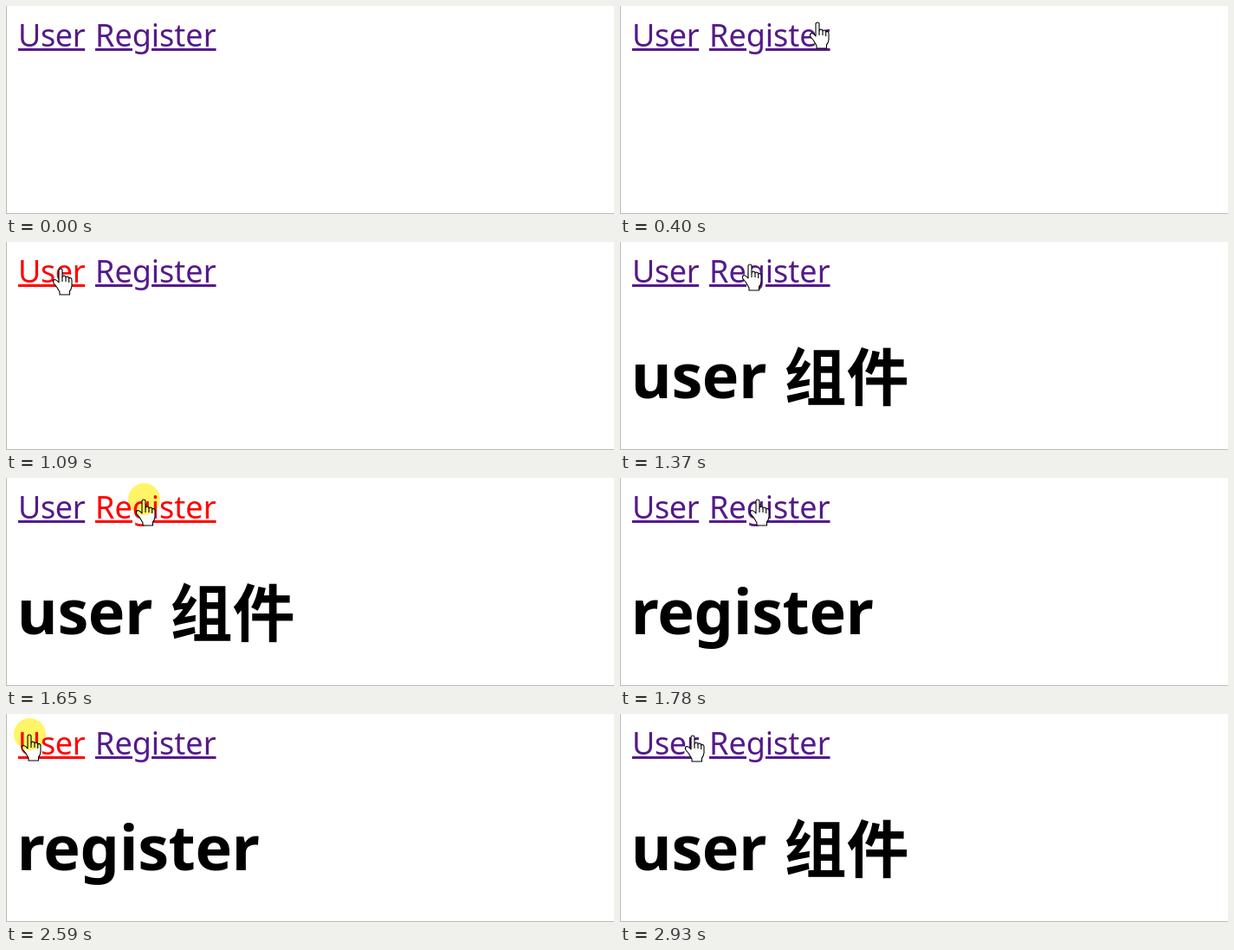
Write an HTML page that moves like this. It is 702x241 px and loops after 3000 ms.

```html
<!DOCTYPE html>
<html lang="zh">
<head>
<meta charset="utf-8">
<title>Router links</title>
<style>
  html, body { margin: 0; width: 100%; height: 100%; overflow: hidden; background: #fff; }
  #stage { position: relative; width: 702px; height: 241px; overflow: hidden; }
  #stage::after {
    content: ""; position: absolute; inset: 0;
    border: solid #bcbcbc; border-width: 0 0 1px 1px;
  }
  .link {
    position: absolute; top: 9px; white-space: nowrap; color: #551a8b;
    font: 36px/49px "Noto Sans", "Open Sans", sans-serif;
    text-decoration: underline; text-decoration-thickness: 2.6px; text-underline-offset: 2px;
  }
  .link.active { color: #f00; }
  #user { left: 14px; letter-spacing: -.4px; }
  #register { left: 103px; }
  svg { position: absolute; inset: 0; }
  .title { font: bold 72px "Noto Sans", "Open Sans", sans-serif; letter-spacing: -.4px; }
  .title .cjk { font-family: "Noto Sans CJK SC", "Noto Sans CJK", sans-serif; letter-spacing: 0; }
  .cursor { fill: #fff; stroke: #000; stroke-width: 1.1; stroke-linejoin: round; }
  #halo { fill: #fff566; mix-blend-mode: multiply; }
</style>
</head>
<body>
<div id="stage">
  <span class="link" id="user">User</span>
  <span class="link" id="register">Register</span>
  <svg width="702" height="241" viewBox="0 0 702 241">
    <text class="title" id="userTitle" x="12.5" y="181">user<tspan class="cjk" x="189.5" y="182.5">组件</tspan></text>
    <text class="title" id="registerTitle" x="12.5" y="181">register</text>
    <path id="arrow" class="cursor" d="M0 0V22L5 17.5L8.5 26L12 24.5L8.4 16.2H15.5Z"/>
    <g id="hand" class="cursor">
      <path d="M-3 15V2Q-3 0 -1 0Q1 0 1 2V10Q1.2 8 3.2 8Q5 8.2 5 10Q5.2 9 7 9Q8.7 9.2 8.7 11Q9.5 10.2 10.5 10.5Q12 11 12 13V20Q11.5 24 9.5 26V30H-2V27L-5.5 21L-9.5 16Q-10 13 -8 12.5Q-6 12.5 -3 16Z"/>
      <path fill="none" d="M1 10V15M5 10V15M8.7 11V16"/>
    </g>
    <circle id="halo" cx="-.5" cy="-.5" r="18.5"/>
  </svg>
</div>
<script>
  const LOOP = 3000, STEP = LOOP / 44, ENTER = 70;
  const $ = id => document.getElementById(id);

  const easeIn = p => s => s ** p;
  const easeOut = p => s => 1 - (1 - s) ** p;

  // Each leg sets out from where the one before it ended
  const entry = { x: 606, y: 229 };
  const legs = [
    { start: 70, end: 540, to: { x: 120, y: 17 }, via: { x: 250, y: -30 }, ease: easeOut(1.3) },
    { start: 540, end: 950, to: { x: 64, y: 31 }, ease: easeIn(1.3) },
    { start: 1160, end: 1510, to: { x: 160, y: 25 }, ease: easeOut(2.7) },
    { start: 1910, end: 2390, to: { x: 28, y: 24 }, ease: easeIn(3.4) },
    { start: 2730, end: 2930, to: { x: 85, y: 25 }, ease: easeIn(1) }
  ];

  // The halo fades before the button is released and the page changes
  const clicks = [
    { name: "user", down: 1020, fade: 1090, up: 1160 },
    { name: "register", down: 1650, fade: 1780, up: 1780 },
    { name: "user", down: 2590, fade: 2660, up: 2730 }
  ];

  const mix = (a, b, u) => ({ x: a.x + (b.x - a.x) * u, y: a.y + (b.y - a.y) * u });

  function tipAt(t) {
    let tip = entry;
    for (const { start, end, to, via, ease } of legs) {
      if (t < start) break;
      const u = ease(Math.min(1, (t - start) / (end - start)));
      tip = via ? mix(mix(tip, via, u), mix(via, to, u), u) : mix(tip, to, u);
    }
    return tip;
  }

  const overLink = ({ x, y }) =>
    y > 10 && y < 60 && ((x >= 14 && x <= 91) || (x >= 103 && x <= 243));

  const show = (id, on) => { $(id).style.display = on ? "" : "none"; };

  function draw(t) {
    const shown = t >= ENTER;
    const tip = tipAt(Math.floor(t / STEP + .1) * STEP);
    const press = clicks.find(c => t >= c.down && t < c.up);
    const page = clicks.filter(c => t >= c.up).pop();

    for (const id of ["arrow", "hand", "halo"])
      $(id).setAttribute("transform", `translate(${Math.round(tip.x)} ${Math.round(tip.y)})`);
    show("hand", shown && overLink(tip));
    show("arrow", shown && !overLink(tip));
    show("halo", press && t < press.fade);

    for (const name of ["user", "register"]) {
      $(name).classList.toggle("active", press?.name === name);
      show(name + "Title", page?.name === name);
    }
  }

  const start = performance.now();
  function tick() {
    draw((performance.now() - start) % LOOP);
    requestAnimationFrame(tick);
  }
  tick();
</script>
</body>
</html>
```
